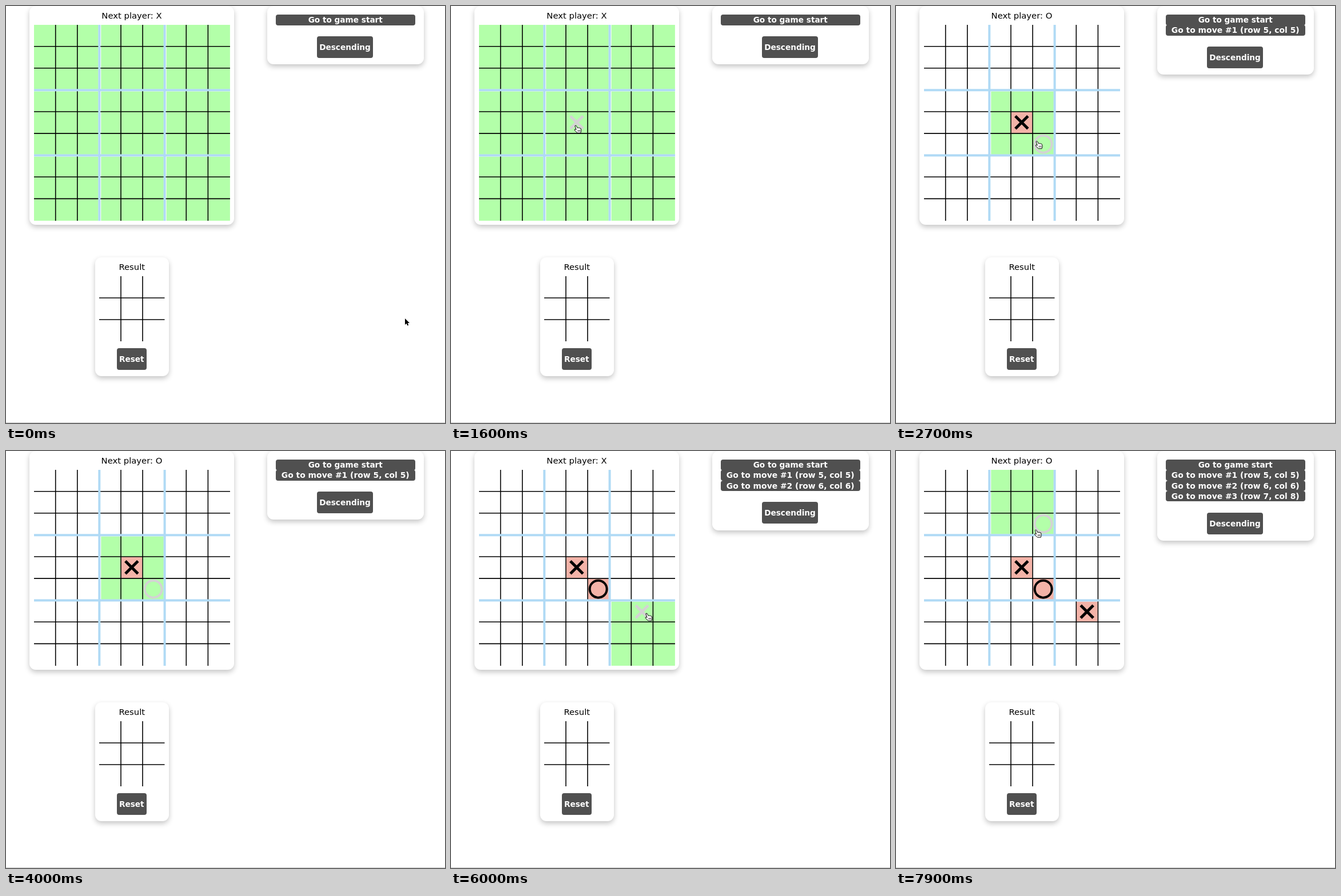
Recreate the animation shown at these times as an HTML page. Size 768x730 px, loop 8 s.

```html
<!DOCTYPE html>
<html lang="en">
<head>
<meta charset="utf-8">
<title>Ultimate tic-tac-toe</title>
<style>
html, body { margin: 0; width: 100%; height: 100%; overflow: hidden; background: #fff; }
body { position: relative; font: 14.8px "DejaVu Sans", sans-serif; color: #000; text-align: center; }
.card { position: absolute; background: #fff; border-radius: 11px; line-height: 34px;
  box-shadow: 0 4px 10px rgba(0, 0, 0, .23); }
.btn { position: absolute; box-sizing: border-box; background: #505050; color: #fff; border-radius: 4px;
  font-weight: bold; font-size: 13.65px; white-space: nowrap; }
.row { left: 15.5px; width: 243.5px; height: 18.6px; line-height: 19.6px; }
.move { font-size: 13.9px; }
.big { height: 38.2px; line-height: 39.2px; }
#board { left: 41px; top: 0; width: 358px; height: 383px; }
#log { left: 456.5px; top: 0; width: 274px; }
#result { left: 155.5px; top: 440px; width: 129.5px; height: 208px; }
#order { left: 87.5px; width: 98px; }
#reset { left: 38px; top: 159px; width: 52.5px; }
svg { position: absolute; left: 0; top: 0; }
</style>
</head>
<body>
<div class="card" id="board"></div>
<div class="card" id="log">
  <div id="rows"></div>
  <div class="btn big" id="order">Descending</div>
</div>
<div class="card" id="result">Result<div class="btn big" id="reset">Reset</div></div>
<svg width="768" height="730">
  <g id="cells"></g>
  <g id="grid" fill="none"></g>
  <g id="marks" fill="none"></g>
  <g id="cursor"></g>
</svg>
<script>
const $ = id => document.getElementById(id);
const LOOP = 8000, STEP = 100, PITCH = 38.1, LEFT = 49, TOP = 33;

// Moves: time, row, column, and the block (row, column) open afterwards
const moves = [
  { t: 1800, r: 4, c: 4, open: [1, 1] },
  { t: 4200, r: 5, c: 5, open: [2, 2] },
  { t: 6200, r: 6, c: 7, open: [0, 1] }
];

// Pointer path: time, x, y
const path = [
  [0, 698, 547], [100, 690, 538], [500, 430, 330], [900, 240, 238], [1400, 217, 209],
  [1900, 217, 209], [2400, 228, 226], [2800, 251, 240], [3100, 253, 238], [4200, 253, 238],
  [4500, 300, 280], [4700, 321.5, 300.5], [5200, 338, 310], [5400, 338, 310],
  [5700, 341, 284], [6200, 341, 284], [6500, 318, 262], [6800, 285, 222],
  [7100, 232, 142], [7400, 244, 141], [7700, 244, 141], [7900, 243.5, 138]
];

function pointer(t) {
  const i = path.findIndex(p => p[0] > t);
  if (i < 0) return path[path.length - 1].slice(1);
  const [t0, x0, y0] = path[i - 1], [t1, x1, y1] = path[i];
  const k = (t - t0) / (t1 - t0);
  return [x0 + (x1 - x0) * k, y0 + (y1 - y0) * k];
}

// Inner edges of a cell along one axis; block borders are thicker
const start = (i, origin, thick) => origin + i * PITCH + (i % 3 || !i ? 0 : thick);
const end = (i, origin) => origin + (i + 1) * PITCH - (i === 8 ? 0 : i % 3 === 2 ? 1.8 : 1.2);
const box = (r, c) => ({
  x0: start(c, LEFT, 3), x1: end(c, LEFT),
  y0: start(r, TOP, 2.2), y1: end(r, TOP)
});

function fill(r0, c0, r1, c1, color) {
  const a = box(r0, c0), b = box(r1, c1);
  return `<rect x="${a.x0}" y="${a.y0}" width="${b.x1 - a.x0}" height="${b.y1 - a.y0}" fill="${color}"/>`;
}

function mark(r, c, isX, color) {
  const b = box(r, c), x = (b.x0 + b.x1) / 2, y = (b.y0 + b.y1) / 2;
  const shape = isX ? '<path d="M-11-11 11 11M11-11-11 11" stroke-width="5"/>'
                    : '<circle r="15" stroke-width="4"/>';
  return `<g transform="translate(${x} ${y})" stroke="${color}">${shape}</g>`;
}

const arrow = '<path d="M0 0V11L2.6 8.7 4.3 12.6 6.2 11.8 4.6 8H8Z" stroke="#fff" stroke-width="1" paint-order="stroke"/>';
const icons = {
  arrow,
  hand: '<path d="M-.2 .8Q1-.6 2.2 .7L4.3 4.6Q5.4 3.6 6.4 4.5 7.6 3.7 8.4 4.9 10 4.5 10.3 6.1L10.8 9.4 9.8 13.2H4.2L.4 9.8Q-1.7 7.8-.6 6.9 .5 6.3 2 7.6Z" fill="#fff" stroke="#000"/>' +
    '<path d="M5 8.2V11M6.8 8V11M8.6 8V11" stroke="#000" stroke-width=".7"/>',
  blocked: arrow + '<g fill="#fff" stroke="#fff" stroke-width="3.4"><circle cx="8" cy="15.5" r="5.2"/></g>' +
    '<g fill="none" stroke="#8a8a8a" stroke-width="1.5"><circle cx="8" cy="15.5" r="5.2"/><path d="M4.4 11.9 11.6 19.1"/></g>'
};

function drawGrid() {
  let thin = "", thick = "";
  for (let i = 1; i < 9; i++) {
    const x = LEFT + i * PITCH, y = TOP + i * PITCH;
    if (i % 3) thin += `M${x - .4} 33V376M49 ${y - .4}H392`;
    else thick += `M${x} 33V376M49 ${y}H392`;
  }
  thin += "M201 473V587M239 473V587M163 511H277.5M163 549H277.5";
  $("grid").innerHTML = `<path d="${thin}" stroke="#000" stroke-width="1.6"/>` +
    `<path d="${thick}" stroke="#b0daf5" stroke-width="4"/>` +
    '<path d="M0 729.5H768" stroke="#c8c8c8"/>';
}

function draw(t) {
  const done = moves.filter(m => m.t <= t), n = done.length;
  const isX = n % 2 === 0, open = n ? done[n - 1].open : null;
  const taken = (r, c) => done.some(m => m.r === r && m.c === c);

  $("board").textContent = "Next player: " + (isX ? "X" : "O");
  $("rows").innerHTML = ["Go to game start", ...done.map((m, i) =>
    `Go to move #${i + 1} (row ${m.r + 1}, col ${m.c + 1})`)].map((s, i) =>
    `<div class="btn row ${i ? "move" : ""}" style="top:${15 + i * 18.3}px">${s}</div>`).join("");
  $("order").style.top = 52.6 + n * 18.3 + "px";
  $("log").style.height = 102 + n * 18.3 + "px";

  let cells = "";
  for (let i = 0; i < 9; i++) {
    const br = Math.floor(i / 3), bc = i % 3;
    if (!open || open[0] === br && open[1] === bc)
      cells += fill(br * 3, bc * 3, br * 3 + 2, bc * 3 + 2, "#b3ffa9");
  }
  for (const m of done) cells += fill(m.r, m.c, m.r, m.c, "#f3b3a8");
  $("cells").innerHTML = cells;

  const [x, y] = pointer(t);
  const c = Math.floor((x - LEFT) / PITCH), r = Math.floor((y - TOP) / PITCH);
  const onBoard = r >= 0 && r < 9 && c >= 0 && c < 9;
  const legal = onBoard && !taken(r, c) &&
    (!open || open[0] === Math.floor(r / 3) && open[1] === Math.floor(c / 3));
  $("marks").innerHTML = done.map((m, i) => mark(m.r, m.c, i % 2 === 0, "#000")).join("") +
    (legal ? mark(r, c, isX, "#d3d3d3") : "");

  const hidden = t >= 3900 && t < 4200;
  $("cursor").innerHTML = hidden ? "" : icons[legal ? "hand" : onBoard ? "blocked" : "arrow"];
  $("cursor").setAttribute("transform", `translate(${x} ${y})`);
}

let last = -1;
function tick(now) {
  const t = Math.floor(now % LOOP / STEP) * STEP;
  if (t !== last) draw(last = t);
  requestAnimationFrame(tick);
}
drawGrid();
draw(0);
requestAnimationFrame(tick);
</script>
</body>
</html>
```
